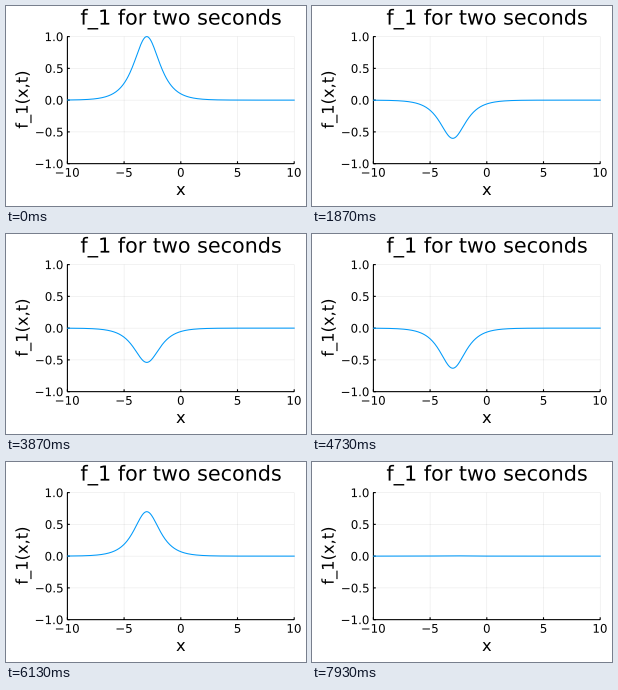
Animation of 300 by 200 pixels, one loop 8000 ms. Source, as a matplotlib script:

```python
import numpy as np
import matplotlib.pyplot as plt
from matplotlib.animation import FuncAnimation
from matplotlib.patches import PathPatch, Rectangle
from matplotlib.path import Path
from matplotlib.textpath import TextPath
from matplotlib.transforms import Affine2D

plt.rcParams["font.family"] = "DejaVu Sans"
plt.rcParams["path.snap"] = False

W, H, DPI = 300, 200, 100
LOOP, TICK = 8000, 10  # ms
STEPS = 120            # poses in one loop
LEFT, RIGHT, TOP, BOTTOM = 61.4, 288.2, 30.6, 157.65
BLUE = "#009afa"
PX = 72 / DPI  # points per pixel

fig = plt.figure(figsize=(W / DPI, H / DPI), dpi=DPI, facecolor="white")
ax = fig.add_axes([0, 0, 1, 1])
ax.set_xlim(0, W)
ax.set_ylim(H, 0)
ax.axis("off")


def to_x(v):
    return LEFT + (v + 10) / 20 * (RIGHT - LEFT)


def to_y(v):
    return BOTTOM - (v + 1) / 2 * (BOTTOM - TOP)


def segments(pairs, width, alpha=1):
    """Draw straight black strokes as one artist."""
    path = Path.make_compound_path(*[Path(p) for p in pairs])
    ax.add_patch(PathPatch(path, fc="none", ec="black", lw=width * PX,
                           alpha=alpha, capstyle="butt"))


def label(s, x, y, size, align=0.5, angle=0):
    """Outline of a text with its baseline at (x, y), in pixels."""
    s = s.replace("-", "\u2212")
    path = TextPath((0, 0), s, size=size)
    box = path.get_extents()
    move = Affine2D().translate(-box.x0 - align * box.width, 0).scale(1, -1)
    move.rotate_deg(-angle).translate(x, y)
    return move.transform_path(path)


x_ticks = [(str(v), to_x(v)) for v in (-10, -5, 0, 5, 10)]
y_ticks = [(f"{v:.1f}", to_y(v)) for v in (-1, -0.5, 0, 0.5, 1)]

segments([[(x, TOP), (x, BOTTOM)] for _, x in x_ticks]
         + [[(LEFT, y), (RIGHT, y)] for _, y in y_ticks], 0.5, 0.1)

segments([[(LEFT, BOTTOM), (RIGHT, BOTTOM)], [(LEFT, TOP), (LEFT, BOTTOM)]]
         + [[(x, BOTTOM), (x, BOTTOM - 2.4)] for _, x in x_ticks]
         + [[(LEFT, y), (LEFT + 2.4, y)] for _, y in y_ticks], 1.1)

texts = [label(s, x, 170.7, 11.85) for s, x in x_ticks]
texts += [label(s, 56.6, y + 4.5, 11.85, align=1) for s, y in y_ticks]
texts += [
    label("f_1 for two seconds", 174.8, 18.6, 20.7),
    label("x", 174.8, 189, 16.3),
    label("f_1(x,t)", 21.7, 94.1, 16.3, angle=90),
]
ax.add_patch(PathPatch(Path.make_compound_path(*texts), fc="black", lw=0))

x = np.linspace(-10, 10, 400)
pulse = 1 / np.cosh(x + 3)
times = np.linspace(0, 4 * np.pi, 200)

curve, = ax.plot(to_x(x), to_y(pulse), color=BLUE, lw=1.05 * PX, zorder=3)
curve.set_clip_path(Rectangle((LEFT - 0.4, TOP - 0.5), RIGHT - LEFT + 0.8,
                              BOTTOM - TOP + 1, transform=ax.transData))


def draw(k):
    # each pose starts on the nearest 10 ms tick
    step = int((k + 0.5) * STEPS * TICK / LOOP)
    curve.set_ydata(to_y(pulse * np.cos(2.3 * times[step])))
    return (curve,)


anim = FuncAnimation(fig, draw, frames=LOOP // TICK, interval=TICK,
                     repeat=True, repeat_delay=0, blit=False)
plt.show()
```
